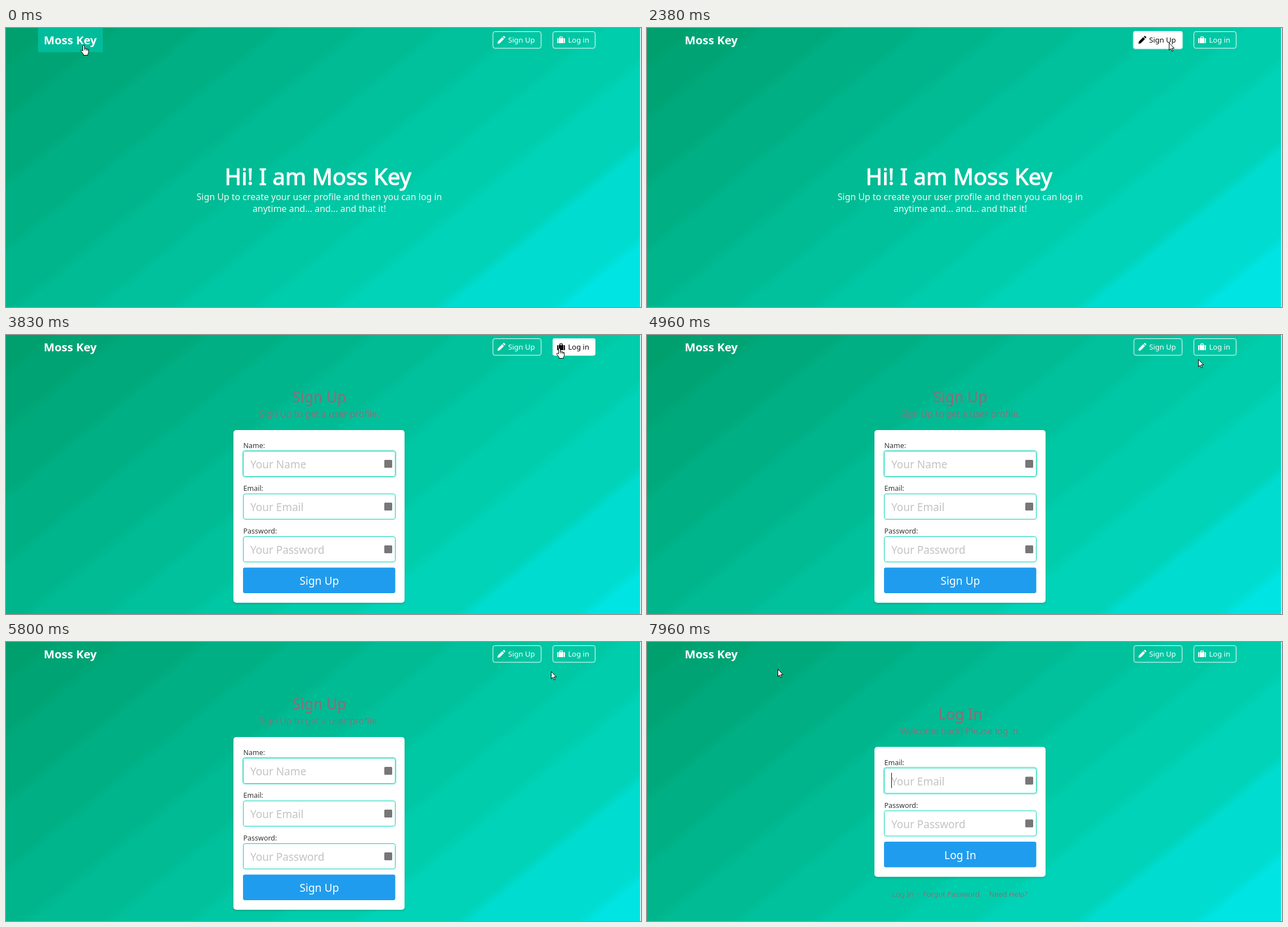
An HTML page that plays this animation: 1128 px wide and 496 px high, repeating every 8 s.

```html
<!DOCTYPE html>
<html lang="en">
<head>
<meta charset="utf-8">
<title>Moss Key</title>
<style>
html, body { margin: 0; width: 100%; height: 100%; overflow: hidden; background: #00b78f; }
svg { display: block; width: 100vw; height: 100vh; }
text { font-family: "Noto Sans", "Open Sans", sans-serif; fill: #fff; }
.mid { text-anchor: middle; }
.brand { font-size: 20.4px; font-weight: 700; }
/* a thin stroke gives the weight between regular and bold */
.hero { font-size: 40px; stroke: #fff; stroke-width: 1.1px; }
.lead { font-size: 15.95px; }
.title { font-size: 26.4px; stroke: #7f757b; stroke-width: .6px; }
.grey { fill: #7f757b; }
.label { font-size: 12.5px; fill: #363636; }
.hint { font-size: 19px; fill: #c3c3c3; }
.send { font-size: 19.2px; }
.nav { font-size: 13px; }
.foot { font-size: 12.8px; }
.dark, .dark text { fill: #0a0a0a; }
.box { fill: #fff; stroke: #00d1b2; }
.card { fill: #fff; filter: drop-shadow(0 2px 1.5px rgba(10,10,10,.16)); }

/* Everything moves in hard steps on one shared 8 s clock. */
.t { animation: 8s step-end infinite; }
.off { opacity: 0; }
#view { animation-name: scroll; }
#home { animation-name: home; }
#signup { animation-name: signup; }
#login { animation-name: login; }
#brand-hover { animation-name: brand; }
#up-hover { animation-name: up; }
#up-ring { animation-name: up-ring; }
#in-hover { animation-name: in; }
#in-ring { animation-name: in-ring; }
#icons { animation-name: icons; }
#signup .ready { animation-name: signup-ready; }
#login .ready { animation-name: login-ready; }
#signup .caret { animation-name: signup-caret; }
#login .caret { animation-name: login-caret; }
#cursor { animation-name: cursor; }
#arrow { animation-name: arrow; }
#hand { animation-name: hand; }

@keyframes scroll {
  63.875% { transform: translateY(-35px); }
  65.625% { transform: translateY(-41px); }
  70.75% { transform: translateY(-27px); }
  72.5% { transform: none; }
}
@keyframes home { 0% { opacity: 1; } 37.125% { opacity: 0; } }
@keyframes signup { 37.125% { opacity: 1; } 85.875% { opacity: 0; } }
@keyframes login { 85.875%, 100% { opacity: 1; } }
@keyframes brand { 0% { opacity: 1; } 14.25% { opacity: 0; } }
@keyframes up { 22.75% { opacity: 1; } 46% { opacity: 0; } }
@keyframes up-ring { 29.75% { opacity: 1; } 37.125% { opacity: 0; } }
@keyframes in {
  47.875%, 75.625%, 87.5% { opacity: 1; }
  60.5%, 85.875%, 90.75% { opacity: 0; }
}
@keyframes in-ring { 80.5% { opacity: 1; } 85.875% { opacity: 0; } }
@keyframes icons { 85.875% { opacity: 0; } 87.5% { opacity: 1; } }
@keyframes signup-ready { 39% { opacity: 1; } }
@keyframes login-ready { 87.5% { opacity: 1; } }
@keyframes signup-caret {
  39%, 51.625%, 63.875%, 77.25% { opacity: 1; }
  44.125%, 56.75%, 70.75% { opacity: 0; }
}
@keyframes login-caret { 87.5%, 99.5% { opacity: 1; } 94.25% { opacity: 0; } }
@keyframes hand {
  0%, 22.75%, 37.125%, 47.875%, 75.625%, 85.875% { opacity: 1; }
  14.25%, 29.75%, 46%, 60.5%, 80.5%, 90.75% { opacity: 0; }
}
@keyframes arrow {
  0%, 22.75%, 37.125%, 47.875%, 75.625%, 85.875% { opacity: 0; }
  14.25%, 29.75%, 46%, 60.5%, 80.5%, 90.75% { opacity: 1; }
}
@keyframes cursor {
  0% { transform: translate(138px, 30px); }
  1.5% { transform: translate(138px, 28px); }
  3.125% { transform: translate(137px, 26px); }
  4.875% { transform: translate(136px, 25px); }
  12.625% { transform: translate(150px, 30px); }
  14.25% { transform: translate(225px, 42px); }
  16% { transform: translate(360px, 50px); }
  17.75% { transform: translate(540px, 49px); }
  19.375% { transform: translate(720px, 44px); }
  21.125% { transform: translate(855px, 34px); }
  22.75% { transform: translate(927px, 26px); }
  44.125% { transform: translate(940px, 24px); }
  46% { transform: translate(960px, 23px); }
  47.875% { transform: translate(983px, 23px); }
  49.75% { transform: translate(992px, 23px); }
  51.625% { transform: translate(995px, 24px); }
  60.5% { transform: translate(979px, 43px); }
  62.25%, 65.625% { transform: translate(963px, 56px); }
  72.5% { transform: translate(968px, 52px); }
  74% { transform: translate(975px, 42px); }
  75.625% { transform: translate(985px, 32px); }
  77.25% { transform: translate(993px, 26px); }
  78.875% { transform: translate(997px, 23px); }
  89.125% { transform: translate(980px, 30px); }
  90.75% { transform: translate(950px, 43px); }
  92.5% { transform: translate(850px, 52px); }
  94.25% { transform: translate(700px, 56px); }
  95.875% { transform: translate(540px, 54px); }
  97.625% { transform: translate(376px, 50px); }
  99.5% { transform: translate(232px, 48px); }
}
</style>
</head>
<body>
<svg id="stage" viewBox="0 0 1128 496" preserveAspectRatio="none">
  <defs>
    <linearGradient id="short" gradientUnits="userSpaceOnUse" x1="219.4" y1="-177.6" x2="908.6" y2="673.6"></linearGradient>
    <linearGradient id="tall" href="#short" x1="209.3" y1="-169.5" x2="918.7" y2="706.5"/>
    <path id="pencil" d="M0 14l.8-4L8.5 2.3l3.2 3.2L4 13.2zM9.4 1.4l1-1a1.3 1.3 0 0 1 1.8 0l1.4 1.4a1.3 1.3 0 0 1 0 1.8l-1 1z"/>
    <path id="case" fill-rule="evenodd" d="M1.3 3h.9v9h-.9A1.3 1.3 0 0 1 0 10.7V4.3A1.3 1.3 0 0 1 1.3 3zM11.8 3h.9A1.3 1.3 0 0 1 14 4.3v6.4a1.3 1.3 0 0 1-1.3 1.3h-.9zM3 12V3h1V1.5Q4 0 5.4 0h3.2Q10 0 10 1.5V3h1v9zM5.3 3h3.4V1.3H5.3z"/>
  </defs>

  <g id="view" class="t">
    <g id="home" class="t">
      <rect width="1128" height="496" fill="url(#short)"/>
      <text class="hero" x="388.5" y="279">Hi! I am Moss Key</text>
      <g opacity=".92">
        <text class="lead mid" x="556.5" y="306">Sign Up to create your user profile and then you can log in</text>
        <text class="lead mid" x="556.5" y="327">anytime and... and... and that it!</text>
      </g>
    </g>
    <g id="signup" class="t off"></g>
    <g id="login" class="t off"></g>

    <rect id="brand-hover" class="t off" x="57" width="115" height="43" fill="#00bc9b"/>
    <text class="brand" x="67" y="29">Moss Key</text>

    <g fill="none" stroke="#fff">
      <rect x="865" y="6.5" width="85.5" height="29.5" rx="3.4"/>
      <rect x="971.5" y="6.5" width="75" height="29.5" rx="3.4"/>
    </g>
    <g id="icons" class="t" fill="#fff">
      <use href="#pencil" x="873" y="14"/>
      <use href="#case" x="979" y="15"/>
    </g>
    <text class="nav" x="892" y="26">Sign Up</text>
    <text class="nav" x="998.5" y="26">Log in</text>

    <rect id="up-ring" class="t off" x="863" y="5" width="89" height="33" rx="4.5" fill="#fff" fill-opacity=".5"/>
    <g id="up-hover" class="t off dark">
      <rect x="864.5" y="6" width="86.5" height="30.5" rx="3.4" fill="#fff"/>
      <use href="#pencil" x="873" y="14"/>
      <text class="nav" x="892" y="26">Sign Up</text>
    </g>
    <rect id="in-ring" class="t off" x="970" y="5" width="78" height="33" rx="4.5" fill="#fff" fill-opacity=".5"/>
    <g id="in-hover" class="t off dark">
      <rect x="971" y="6" width="76" height="30.5" rx="3.4" fill="#fff"/>
      <use href="#case" x="979" y="15"/>
      <text class="nav" x="998.5" y="26">Log in</text>
    </g>
  </g>
  <rect x="1126.5" width="1.5" height="496" fill="#fff"/>

  <g id="cursor" class="t" fill="#fff" stroke="#000" stroke-linejoin="round">
    <path id="arrow" class="t off" d="M.5 .5V13.5l3-2.8 2 4.8 2-.9-2-4.6h4.2z"/>
    <path id="hand" class="t" d="M-1.5 11V2Q-1.5 .5 0 .5T1.5 2V6.5Q4 5.5 4.3 7 6.5 6.3 6.8 7.8 8.8 7.4 8.8 9V13Q8.8 14.5 7.3 16.5V18.5H-.5V16.5L-4.5 11.5Q-5.2 9.5 -3.8 9.3 -2.5 9.3 -1.5 11zM1.5 6.5V9.5M4.3 7V10M6.8 7.8V10.5"/>
  </g>
</svg>
<script>
const $ = id => document.getElementById(id);
const text = (cls, x, y, s) => `<text class="${cls}" x="${x}" y="${y}">${s}</text>`;

// The backdrop: a three-colour gradient shown as flat bands with soft edges
const mix = (a, b, t) => a + (b - a) * t;
const tone = t => t < .71
  ? `rgb(0,${mix(158, 209, t / .71)},${mix(108, 178, t / .71)})`
  : `rgb(0,${mix(209, 231, (t - .71) / .29)},${mix(178, 235, (t - .71) / .29)})`;
const edges = [0, .05, .115, .197, .28, .362, .444, .526, .608, .69, .795, .915, 1];
const soft = .008;
$("short").innerHTML = edges.slice(1).map((b, i) => {
  const a = edges[i], color = tone((a + b) / 2);
  return [a + soft, b - soft].map(o => `<stop offset="${o}" stop-color="${color}"/>`).join("");
}).join("");

// y is the top edge of the input box
const field = (name, y) =>
  text("label", 421.5, y - 5, name + ":") +
  `<rect class="box" x="421.5" y="${y + .5}" width="270" height="45" rx="3.4"/>` +
  text("hint", 434, y + 31, "Your " + name) +
  `<rect class="t off ready" x="672" y="${y + 16}" width="14" height="14" rx="1.5" fill="#777"/>`;

function form({ id, bg, height, top, title, lead, fields, links }) {
  const first = top + 37, end = first + fields.length * 76;
  const button = end - 20.5, bottom = end + 42;
  const dots = links.slice(1).map(x => x - 9);
  $(id).innerHTML =
    `<rect width="1128" height="${height}" fill="url(#${bg})"/>` +
    text("title grey mid", 556.5, top - 49, title) +
    text("lead grey mid", 556.5, top - 23, lead) +
    `<rect class="card" x="404" y="${top}" width="304" height="${bottom - top}" rx="5"/>` +
    `<rect class="t off ready" x="420" y="${first - 1}" width="273" height="48" rx="5" fill="none" stroke="#00d1b2" stroke-opacity=".28" stroke-width="2"/>` +
    fields.map((name, i) => field(name, first + i * 76)).join("") +
    `<path class="t off caret" d="M434.5 ${first + 9}v27" stroke="#111"/>` +
    `<rect x="421" y="${button}" width="270.5" height="45.5" rx="3.4" fill="#209cee"/>` +
    text("send mid", 556.5, button + 30.5, title) +
    [title, "Forgot Password", "Need Help?"].map((s, i) => text("foot grey", links[i], bottom + 35.5, s)).join("") +
    dots.map(x => text("foot grey mid", x, bottom + 35.5, "·")).join("");
}

form({
  id: "signup", bg: "tall", height: 537, top: 169, title: "Sign Up",
  lead: "Sign Up to get a user profile.",
  fields: ["Name", "Email", "Password"], links: [430, 495, 612.5]
});
form({
  id: "login", bg: "short", height: 496, top: 186.5, title: "Log In",
  lead: "Welcome back! Please log in.",
  fields: ["Email", "Password"], links: [435.5, 490, 607.5]
});
</script>
</body>
</html>
```
